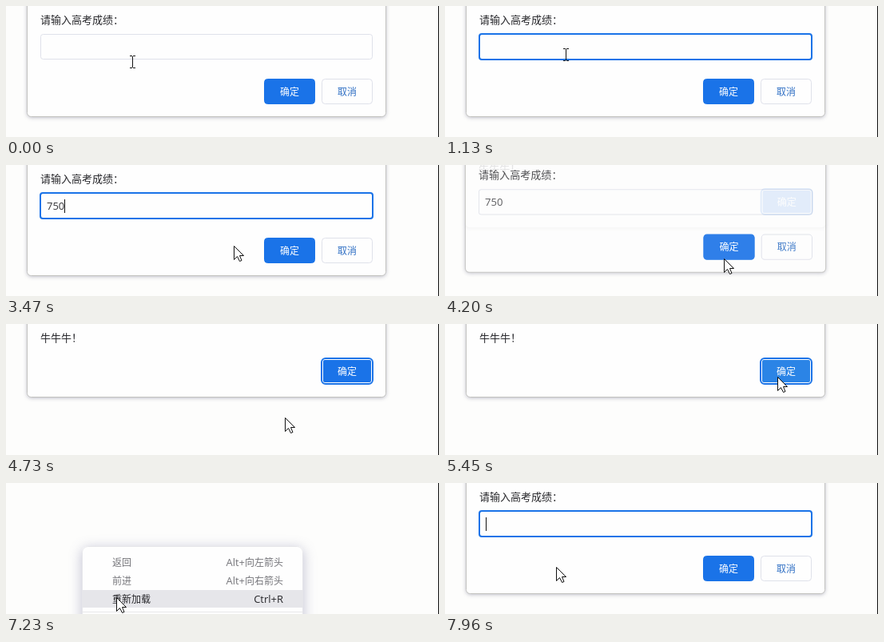
An HTML page with a canvas for the animation above (8000 ms loop, 542 by 164 pixels).

```html
<!DOCTYPE html>
<html lang="zh-CN">
<head>
<meta charset="utf-8">
<title>成绩输入框</title>
<style>
  html, body { margin: 0; width: 100%; height: 100%; overflow: hidden; background: #fdfdfc; }
  canvas { display: block; width: 542px; height: 164px; }
</style>
</head>
<body>
<canvas id="stage" width="542" height="164"></canvas>
<script>
const W = 542, H = 164, LOOP = 8000;
const screen2d = document.getElementById('stage').getContext('2d');
const buffer = Object.assign(document.createElement('canvas'), { width: W, height: H });
const buffer2d = buffer.getContext('2d');
let ctx = screen2d;

const CJK = '"Noto Sans CJK SC", "Noto Sans CJK", sans-serif';
const LATIN = '"Open Sans", "Noto Sans", sans-serif';
const PAGE = '#fdfdfc', PANEL = '#fefefe', BLUE = '#1a73e8', HOVER = '#2b84e6';
const PALE = '#dfe1ea', INK = '#26262a', GREY = '#75757a';

// Pointer keys: time, x, y of the hot spot
const POINTER = [
  [40, 158, 70], [240, 151, 61], [2990, 151, 61], [3760, 347, 120],
  [3900, 349, 117], [4730, 349, 117], [5410, 416, 66], [5600, 416, 66],
  [6180, 147, 123], [6380, 147, 123], [6550, 95, 80], [6850, 95, 80],
  [7200, 138, 143], [7420, 138, 143], [7750, 139, 105]
];
const TYPED = [[1820, '7'], [2100, '75'], [2260, '750']];
const CARET_ON = [[570, 1130], [1660, 2830], [3360, 3890], [7860, 8000]];

const ramp = (t, a, b) => Math.min(1, Math.max(0, (t - a) / (b - a)));
const ease = u => u * u * (3 - 2 * u);
const within = (t, a, b) => t >= a && t < b;

function pointerAt(t) {
  let prev = POINTER[0];
  for (const key of POINTER) {
    if (t < key[0]) {
      const u = ease(ramp(t, prev[0], key[0]));
      return [prev[1] + (key[1] - prev[1]) * u, prev[2] + (key[2] - prev[2]) * u].map(Math.round);
    }
    prev = key;
  }
  return [prev[1], prev[2]];
}

function box(x, y, w, h, r, fill, stroke, line = 1) {
  ctx.beginPath();
  ctx.roundRect(x, y, w, h, r);
  if (fill) { ctx.fillStyle = fill; ctx.fill(); }
  if (stroke) { ctx.strokeStyle = stroke; ctx.lineWidth = line; ctx.stroke(); }
}

function label(str, x, y, size, color, family = CJK, align = 'left') {
  ctx.font = `${size}px ${family}`;
  ctx.fillStyle = color;
  ctx.textAlign = align;
  ctx.textBaseline = 'alphabetic';
  ctx.fillText(str, x, y);
  return ctx.measureText(str).width;
}

function shadowed(blur, dy, color, draw) {
  ctx.save();
  ctx.shadowBlur = blur;
  ctx.shadowOffsetY = dy;
  ctx.shadowColor = color;
  draw();
  ctx.restore();
}

function panel(bottom) {
  shadowed(5, 1, 'rgba(90,90,120,.45)', () =>
    box(26.5, -20, 449, bottom + 19.5, 5, PANEL));
  box(26.5, -20, 449, bottom + 19.5, 5, null, '#c3c3c0');
}

function button(str, x, y, fill, color, edge) {
  box(x + .5, y + .5, 63, 31, 4, fill, edge);
  label(str, x + 32, y + 20.5, 12, color, CJK, 'center');
}

function prompt(text, focus, caret) {
  panel(139);
  label('请输入高考成绩：', 43, 22, 13, INK);
  box(43.5, 35.5, 415, 31, 3, PANEL, PALE);
  if (focus > 0) {
    ctx.save();
    ctx.globalAlpha = focus;
    box(43, 35, 416, 32, 3, null, BLUE, 2);
    ctx.restore();
  }
  const w = label(text, 51, 56, 13, '#36363a', LATIN);
  if (caret) {
    ctx.fillStyle = '#111';
    ctx.fillRect(Math.round(51 + w), 43, 1, 17);
  }
  button('确定', 323, 91, BLUE, '#fff', BLUE);
  button('取消', 395, 91, PANEL, '#2f6fc4', PALE);
}

function alertBox(hover) {
  panel(92);
  label('牛牛牛！', 43, 22, 13, INK);
  box(395, 43, 64, 32, 5, '#fff', BLUE, 2);
  box(397, 45, 60, 28, 2, hover ? HOVER : BLUE);
  label('确定', 427, 63.5, 12, '#fff', CJK, 'center');
}

// The key part is set in the CJK face, the modifier in the Latin one
function menuRow(name, mod, key, y, color) {
  label(name, 133, y, 12, color);
  const w = key ? label(key, 347, y, 12, color, CJK, 'right') : 0;
  label(mod, 347 - w, y, 13, color, LATIN, 'right');
}

function menu(hover) {
  shadowed(16, 3, 'rgba(100,100,150,.4)', () => box(95, 79, 277, 120, 7, PANEL));
  box(95.5, 79.5, 276, 120, 7, null, '#e6e6ea');
  if (hover) {
    ctx.fillStyle = '#e6e6ea';
    ctx.fillRect(96, 134, 275, 22);
  }
  menuRow('返回', 'Alt+', '向左箭头', 104, GREY);
  menuRow('前进', 'Alt+', '向右箭头', 127, GREY);
  menuRow('重新加载', 'Ctrl+R', '', 150, INK);
  ctx.fillStyle = '#e8e8ea';
  ctx.fillRect(96, 161, 275, 1);
}

// Paints a group off screen, then blends it as one faded, lifted and scaled sheet
function layer(alpha, lift, grow, paint) {
  if (alpha <= 0) return;
  ctx = buffer2d;
  ctx.clearRect(0, 0, W, H);
  ctx.save();
  ctx.translate(251, -lift);
  ctx.scale(1 + grow, 1 + grow);
  ctx.translate(-251, 0);
  paint();
  ctx.restore();
  ctx = screen2d;
  ctx.globalAlpha = alpha;
  ctx.drawImage(buffer, 0, 0);
  ctx.globalAlpha = 1;
}

function arrow(x, y) {
  const pts = [[0, 0], [0, 17], [4, 13], [7, 19], [9.5, 18], [7, 12], [12, 12]];
  ctx.beginPath();
  pts.forEach(([px, py]) => ctx.lineTo(x + px + .5, y + py + .5));
  ctx.closePath();
  ctx.fillStyle = '#fff';
  ctx.fill();
  ctx.strokeStyle = '#111';
  ctx.lineWidth = 1;
  ctx.stroke();
}

function ibeam(x, y) {
  ctx.fillStyle = '#111';
  ctx.fillRect(x, y - 7, 1, 14);
  for (const edge of [y - 8, y + 7]) {
    ctx.fillRect(x - 3, edge, 3, 1);
    ctx.fillRect(x + 1, edge, 3, 1);
  }
}

function draw(t) {
  ctx.fillStyle = PAGE;
  ctx.fillRect(0, 0, W, H);

  const [x, y] = pointerAt(t);
  const caret = CARET_ON.some(([a, b]) => within(t, a, b));
  const text = TYPED.reduce((s, [at, v]) => t >= at ? v : s, '');

  if (t < 4340) {
    const out = ramp(t, 4140, 4340);
    const focus = within(t, 570, 4100) ? (t < 610 ? .5 : 1) : 0;
    layer(1 - out * out, 16 * out, .016 * out, () => prompt(text, focus, caret));
  }
  if (within(t, 4175, 5800)) {
    const shown = ramp(t, 4175, 4400), out = ramp(t, 5570, 5780);
    const hover = x > 395 && x < 459 && y > 43 && y < 75;
    layer(shown * (1 - out * out), 15 * (1 - shown) + 16 * out,
      .005 * (1 - shown) + .016 * out, () => alertBox(hover));
  }
  if (within(t, 6750, 7480)) {
    layer(ramp(t, 6720, 6850) * (1 - ramp(t, 7390, 7470)), 0, 0,
      () => menu(y >= 134 && t < 7440));
  }
  if (t >= 7620) {
    const shown = ramp(t, 7620, 7850);
    layer(shown, 15 * (1 - shown), .005 * (1 - shown), () => prompt('', 1, caret));
  }

  ctx.fillStyle = '#111';
  ctx.fillRect(W - 1, 0, 1, H);

  const overField = t < 4100 && x > 43 && x < 459 && y > 35 && y < 72;
  (overField ? ibeam : arrow)(x, y);
}

const start = performance.now();
function tick() {
  draw((performance.now() - start) % LOOP);
  requestAnimationFrame(tick);
}
tick();
</script>
</body>
</html>
```
